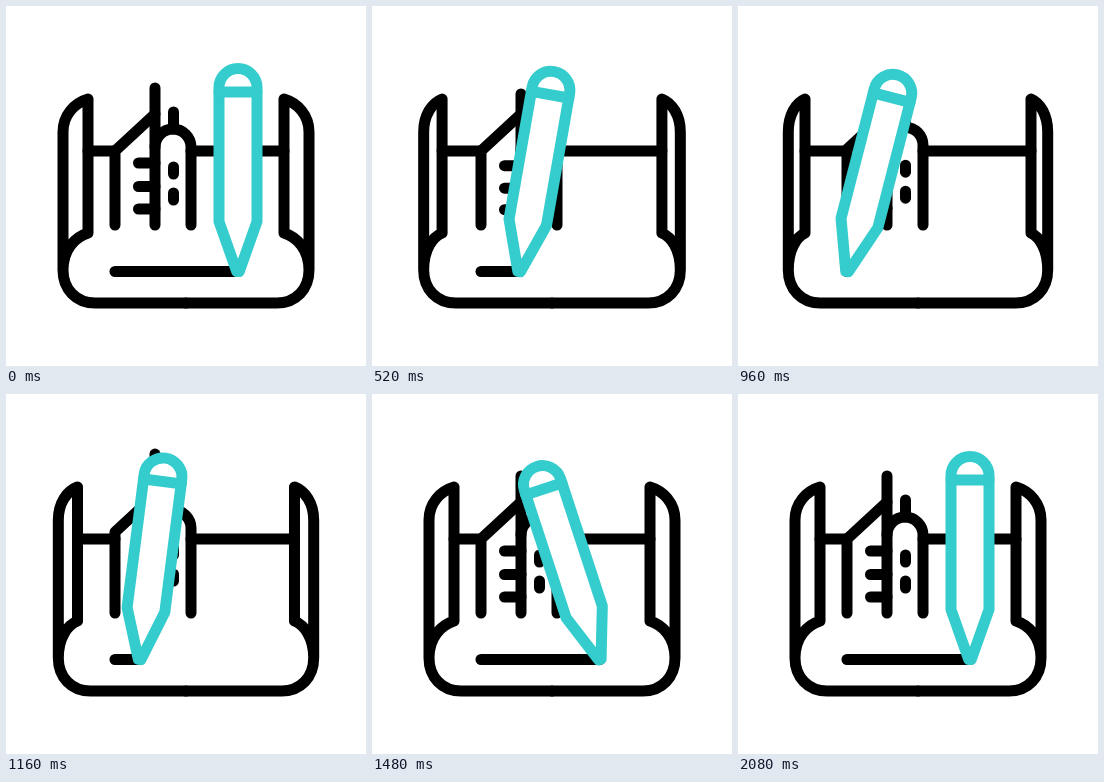
An HTML page with a canvas for the animation above (2.2 s loop, 360 by 360 pixels).

```html
<!DOCTYPE html>
<html lang="en">
<head>
<meta charset="utf-8">
<title>Blueprint and pencil</title>
<style>
html, body { margin: 0; width: 100%; height: 100%; overflow: hidden; background: #fff; }
canvas { display: block; width: 100vmin; height: 100vmin; }
</style>
</head>
<body>
<canvas id="stage" width="360" height="360"></canvas>
<script>
const ctx = document.getElementById('stage').getContext('2d');
const LOOP = 2200, STEP = 40, START = 240;
const INK = '#000', TEAL = '#34cccc';

// Keyframes are [time, value] pairs, eased in and out.
function track(t, keys) {
  if (t <= keys[0][0]) return keys[0][1];
  for (let i = 1; i < keys.length; i++) {
    const [t0, a] = keys[i - 1], [t1, b] = keys[i];
    if (t < t1) {
      const u = (t - t0) / (t1 - t0);
      return a + (b - a) * u * u * (3 - 2 * u);
    }
  }
  return keys[keys.length - 1][1];
}

function stroke(d, color = INK, fill) {
  const p = new Path2D(d);
  if (fill) { ctx.fillStyle = fill; ctx.fill(p); }
  ctx.strokeStyle = color;
  ctx.stroke(p);
}

function drawSheet(open) {
  const x = 57 - 6.7 * open, inner = 82 - 15 * open;
  const mid = (x + inner) / 2;
  stroke(`M${inner} 145H109M185 145H${360 - inner}`);
  for (const side of [1, -1]) {
    ctx.save();
    if (side < 0) { ctx.translate(360, 0); ctx.scale(-1, 1); }
    stroke(`M180 297H${x + 32}C${x + 13} 297 ${x} 283 ${x} 264V126` +
      `C${x} 109 ${mid - 1} 97 ${inner} 93V227` +
      `C${mid} 231 ${x} 243 ${x} 264`);
    ctx.restore();
  }
}

function drawTown(bounce) {
  const shift = (down, up) => bounce > 0 ? bounce * down : bounce * up;
  const wall = shift(0, 7), bar = shift(8, 22), arch = shift(6, 7);

  stroke(`M109 219V${145 + wall}L149 ${108 + wall}`);
  stroke(`M149 219V${82 + bar}`);
  for (const y of [157, 180.5, 203]) {
    stroke(`M132.5 ${y + bar * (219 - y) / 137}H149`);
  }
  stroke(`M149 ${141 + arch}A18 18 0 0 1 185 ${141 + arch}V219`);
  stroke(`M167.5 ${106 + arch}V${123 + arch}`);
  for (const y of [161, 187]) {
    stroke(`M167.5 ${y + arch}v7`);
  }
}

function drawPencil(x, angle) {
  ctx.save();
  ctx.translate(x, 265.5);
  ctx.rotate(angle * Math.PI / 180);
  stroke('M-19 -50V-184A19 19 0 0 1 19 -184V-50L1.3 0H-1.3Z', TEAL, '#fff');
  stroke('M-19 -179.5H19', TEAL);
  ctx.restore();
}

function draw(t) {
  if (t < START) t = 0;
  const open = track(t, [[180, 0], [660, 1], [1000, 1], [1440, 0]]);
  const bounce = track(t, [[180, 0], [690, 1], [1150, -1], [1450, 0]]);
  const tip = track(t, [[180, 232], [720, 109], [1010, 109], [1530, 231], [2020, 232]]);
  const angle = track(t, [[180, 0], [720, 14.4], [1010, 14.4], [1510, -18.5], [2020, 0]]);

  ctx.fillStyle = '#fff';
  ctx.fillRect(0, 0, 360, 360);
  ctx.lineWidth = 11;
  ctx.lineCap = ctx.lineJoin = 'round';
  drawSheet(open);
  drawTown(bounce);
  stroke(`M109 265.5H${tip}`);
  drawPencil(tip, angle);
}

const begin = performance.now();
function tick() {
  const t = (performance.now() - begin) % LOOP;
  draw(Math.floor(t / STEP) * STEP);
  requestAnimationFrame(tick);
}
tick();
</script>
</body>
</html>
```
